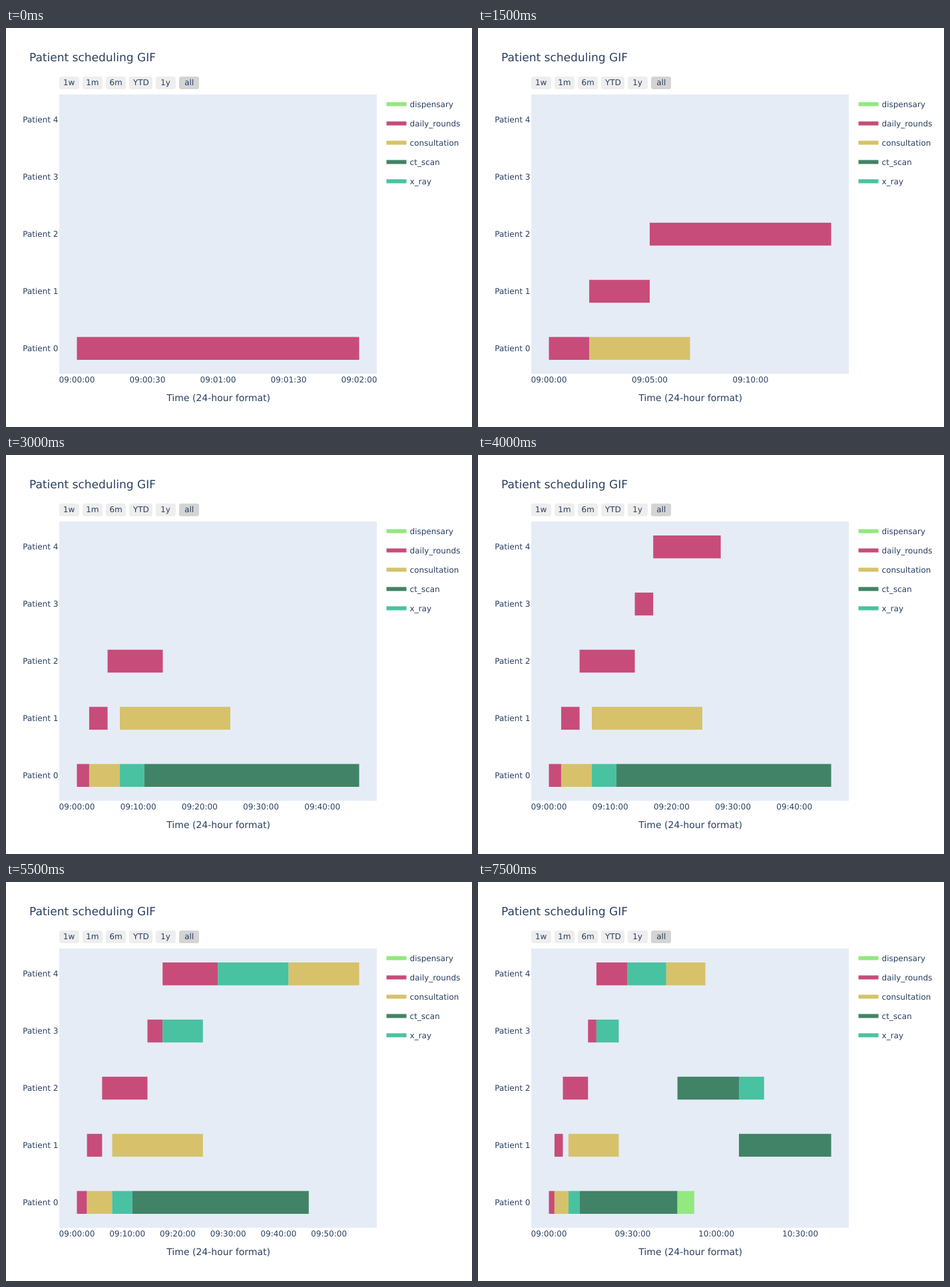
A matplotlib script that plays this animation: 700 by 600 pixels, repeating every 8000 ms.

```python
import matplotlib.pyplot as plt
from matplotlib.animation import FuncAnimation
from matplotlib.patches import FancyBboxPatch, PathPatch, Rectangle
from matplotlib.textpath import TextPath
from matplotlib.transforms import Affine2D

plt.rcParams["font.family"] = "DejaVu Sans"

W, H, DPI = 700, 600, 100
LEFT, TOP, PLOT_W, PLOT_H = 80, 100, 477, 420
PAD_X, PAD_Y = PLOT_W / 18, PLOT_H / 20
ROW = (PLOT_H - 2 * PAD_Y) / 4.4
BAR_H = 0.4 * ROW
INK = "#2a3f5f"
TICK_STEPS = (0.5, 1, 2, 5, 10, 15, 30)

COLORS = {
    "dispensary": "#93e880",
    "daily_rounds": "#c84c79",
    "consultation": "#d7c26b",
    "ct_scan": "#418366",
    "x_ray": "#48c2a0",
}

# patient, activity, start minute, end minute, in order of appearance
TASKS = [
    (0, "daily_rounds", 0, 2),
    (1, "daily_rounds", 2, 5),
    (0, "consultation", 2, 7),
    (2, "daily_rounds", 5, 14),
    (1, "consultation", 7, 25),
    (0, "x_ray", 7, 11),
    (0, "ct_scan", 11, 46),
    (3, "daily_rounds", 14, 17),
    (4, "daily_rounds", 17, 28),
    (3, "x_ray", 17, 25),
    (4, "x_ray", 28, 42),
    (4, "consultation", 42, 56),
    (2, "ct_scan", 46, 68),
    (0, "dispensary", 46, 52),
    (1, "ct_scan", 68, 101),
    (2, "x_ray", 68, 77),
]

fig = plt.figure(figsize=(W / DPI, H / DPI), dpi=DPI, facecolor="white")
ax = fig.add_axes([0, 0, 1, 1])
ax.set_xlim(0, W)
ax.set_ylim(H, 0)
ax.axis("off")


def box(x, y, w, h, color):
    return ax.add_patch(Rectangle((x, y), w, h, fc=color, lw=0, snap=False))


def label(x, baseline, text, size=12, center=False):
    path = TextPath((0, 0), text, size=size)
    if center:
        ext = path.get_extents()
        x -= (ext.x0 + ext.x1) / 2
    path = path.transformed(Affine2D().scale(1, -1).translate(x, baseline))
    return ax.add_patch(PathPatch(path, fc=INK, lw=0, snap=False))


def row_y(patient):
    return TOP + PAD_Y + (4.2 - patient) * ROW


def clock(minutes):
    s = round(minutes * 60)
    return f"{9 + s // 3600:02d}:{s // 60 % 60:02d}:{s % 60:02d}"


def draw_static():
    box(LEFT, TOP, PLOT_W, PLOT_H, "#e5ecf6")
    label(35, 50, "Patient scheduling GIF", 17)
    label(LEFT + PLOT_W / 2, 561, "Time (24-hour format)", 14, center=True)

    x = LEFT
    for name in ("1w", "1m", "6m", "YTD", "1y", "all"):
        w = 35 if name == "YTD" else 30
        color = "#d4d4d4" if name == "all" else "#eeeeee"
        ax.add_patch(FancyBboxPatch((x, 73), w, 19, fc=color, lw=0, snap=False,
                                    boxstyle="round,pad=0,rounding_size=3"))
        label(x + w / 2, 86, name, center=True)
        x += w + 5

    for patient in range(5):
        label(25.2, round(row_y(patient) + 4.2), f"Patient {patient}")

    for i, (name, color) in enumerate(COLORS.items()):
        y = 114.5 + 29 * i
        box(571.54, y - 3, 30, 6, color)
        label(606.54, y + 4.5, name)


moving = []


def update(frame):
    while moving:
        moving.pop().remove()
    tasks = TASKS[:frame + 1]
    span = max(end for *_, end in tasks)
    scale = (PLOT_W - 2 * PAD_X) / span
    x0 = LEFT + PAD_X

    for patient, activity, start, end in tasks:
        moving.append(box(x0 + start * scale, row_y(patient) - BAR_H / 2,
                          (end - start) * scale, BAR_H, COLORS[activity]))

    step = next(s for s in TICK_STEPS if span / s <= 6)
    for k in range(int(span / step) + 1):
        t = k * step
        moving.append(label(x0 + t * scale, 533, clock(t), center=True))
    return moving


draw_static()
anim = FuncAnimation(fig, update, frames=len(TASKS), interval=500,
                     init_func=lambda: [], repeat=True, repeat_delay=0)
plt.show()
```
